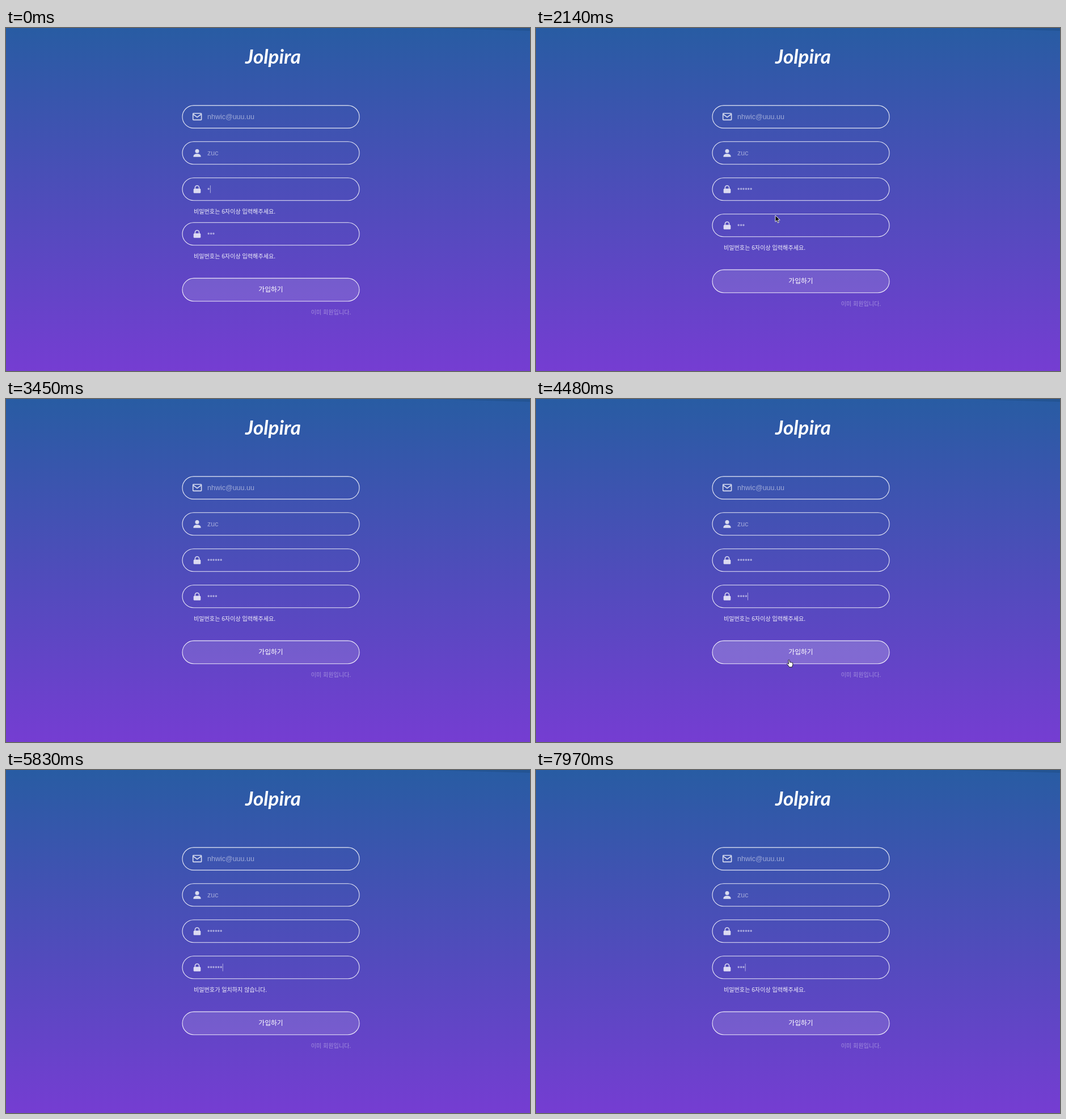
An HTML page that plays this animation: 924x606 px, repeating every 8 s.

```html
<!DOCTYPE html>
<html lang="ko">
<head>
<meta charset="utf-8">
<title>회원가입</title>
<style>
  html, body { margin: 0; width: 100%; height: 100%; overflow: hidden; background: #4e4cba; }
  svg { display: block; width: 100%; height: 100%; }
  text { fill: #fff; font-family: 'Noto Sans CJK KR', 'Noto Sans CJK', 'Noto Sans KR', sans-serif; }
  .logo { font: italic 700 35px Lato, sans-serif; }
  .pill { fill: none; stroke: #fff; stroke-opacity: .88; stroke-width: 1.1; }
  .icon { fill: #fff; opacity: .8; }
  .line { fill: none; stroke: #fff; stroke-width: 1.6; stroke-linejoin: round; }
  .value { font: 12.5px 'Liberation Sans', Arial, sans-serif; fill-opacity: .5; }
  .caret { stroke: #fff; stroke-opacity: .55; }
  .note { font-size: 10.1px; fill-opacity: .92; }
  .button { fill: #fff; }
  .label { font-size: 11.8px; font-weight: 500; }
  .link { font-size: 10.1px; fill-opacity: .4; }
</style>
</head>
<body>
<svg id="stage" viewBox="0 0 924 606">
  <defs>
    <linearGradient id="sky" x2="0" y2="1">
      <stop stop-color="#285ca3"/>
      <stop offset="1" stop-color="#753dd2"/>
    </linearGradient>
    <g id="mail">
      <rect class="line" x="329.7" y="13.9" width="14.9" height="11.6" rx="1"/>
      <path class="line" d="M330.2 15.6L337.1 20.7L344.1 15.6"/>
    </g>
    <g id="user">
      <circle cx="337" cy="16.6" r="3.5"/>
      <path d="M330.4 26.4C330.4 23 333 21.4 337 21.4S343.6 23 343.6 26.4Q343.6 27 343 27H331Q330.4 27 330.4 26.4Z"/>
    </g>
    <g id="lock">
      <rect x="330.7" y="19" width="12.6" height="8" rx="1.6"/>
      <path class="line" d="M333.4 20V17.3A3.6 3.6 0 0 1 340.6 17.3V20"/>
    </g>
  </defs>
  <rect width="924" height="606" fill="url(#sky)"/>
  <path d="M740 0H924V5Z" fill="#143c64" opacity=".25"/>
  <text class="logo" x="471" y="62.5" text-anchor="middle">Jolpira</text>
  <g id="fixed"></g>
  <g id="lower">
    <g id="confirm"></g>
    <text class="note" id="note2" x="331" y="392.3"></text>
    <rect class="pill button" id="button" x="311" y="427.1" width="312" height="40.6" rx="20.3"/>
    <text class="label" x="467" y="450.9" text-anchor="middle">가입하기</text>
    <text class="link" x="608.3" y="491.3" text-anchor="end">이미 회원입니다.</text>
  </g>
  <text class="note" id="note1" x="331" y="328.3">비밀번호는 6자이상 입력해주세요.</text>
  <g id="pointer" stroke-linejoin="round">
    <path id="arrow" fill="#111" stroke="#fff" stroke-width=".9"
      d="M0 0V11.4L2.6 9L4.4 13.2L6.4 12.3L4.6 8.2H8.2Z"/>
    <path id="beam" fill="none" stroke="#111" stroke-width="1"
      d="M-2.5 -6.5Q0 -6.5 0 -5V5Q0 6.5 -2.5 6.5M2.5 -6.5Q0 -6.5 0 -5M0 5Q0 6.5 2.5 6.5M-1.2 1.5H1.2"/>
    <path id="hand" fill="#fff" stroke="#111" stroke-width=".9"
      d="M-1.1 .8Q-1.1 -.2 -.1 -.2T1 .8L1.7 4.4Q2.7 3.5 3.4 4.6Q4.6 3.9 5.2 5Q6.6 4.4 6.9 6L6.8 8.6L5.7 11.6V12.7H.7L-.2 11.2L-3.2 7.6Q-3.8 6.2 -2.4 6L-.2 7.4Z"/>
  </g>
</svg>
<script>
const LOOP = 8000, BLINK = 560, SHIFT = 15;
const SHORT = '비밀번호는 6자이상 입력해주세요.';
const MISMATCH = '비밀번호가 일치하지 않습니다.';
const byId = id => document.getElementById(id);

// [time, number of typed characters]
const first = [[-40, 1], [250, 2], [530, 3], [800, 4], [1150, 5], [1420, 6]];
const second = [[-500, 3], [2350, 3], [2850, 4], [5250, 5], [5500, 6], [7480, 1], [7700, 2], [7930, 3]];
const FOCUS = 2350;

// Visible pointer trips: [time, x, y]
const trips = [
  [[1750, 452, 290], [2140, 422, 331], [2350, 412, 349], [2850, 412, 349]],
  [[3800, 412, 349], [4250, 446, 461], [4700, 446, 461], [5050, 408, 349], [5250, 408, 349]],
  [[6700, 408, 349], [6950, 392, 350], [7200, 287, 350], [7480, 287, 350]]
];

function field(parent, y, icon, value = '') {
  const g = document.createElementNS('http://www.w3.org/2000/svg', 'g');
  g.setAttribute('transform', `translate(0 ${y})`);
  g.innerHTML = `<rect class="pill" x="311" width="312" height="40" rx="20"/>
    <use class="icon" href="#${icon}"/>
    <text class="value" x="355" y="23.8">${value}</text>
    <path class="caret" d="M0 13.3V26.7" visibility="hidden"/>`;
  byId(parent).append(g);
  return { text: g.querySelector('text'), caret: g.querySelector('.caret') };
}

field('fixed', 136.9, 'mail', 'nhwic@uuu.uu');
field('fixed', 200.8, 'user', 'zuc');
const password = field('fixed', 264.8, 'lock');
const repeat = field('confirm', 328.8, 'lock');

const show = (el, on) => el.setAttribute('visibility', on ? 'visible' : 'hidden');

function type(box, keys, t, focused) {
  const [since, count] = keys.findLast(k => k[0] <= t);
  box.text.textContent = '•'.repeat(count);
  box.caret.setAttribute('transform', `translate(${356 + 4.375 * count} 0)`);
  show(box.caret, focused && (t - since) % (2 * BLINK) < BLINK);
  return count;
}

function pointerAt(t) {
  const trip = trips.find(p => t >= p[0][0] && t < p.at(-1)[0]);
  if (!trip) return null;
  const i = trip.findLastIndex(p => p[0] <= t);
  const [t0, x0, y0] = trip[i], [t1, x1, y1] = trip[i + 1];
  const u = (t - t0) / (t1 - t0), e = u * u * (3 - 2 * u);
  return { x: x0 + (x1 - x0) * e, y: y0 + (y1 - y0) * e };
}

function drawPointer(p) {
  const over = p && p.x > 311 && p.x < 623 && p.y > 427 && p.y < 468;
  const inText = p && p.x > 352 && p.x < 605 && [284.8, 348.8].some(y => Math.abs(p.y - y) < 8);
  show(byId('hand'), over);
  show(byId('beam'), inText);
  show(byId('arrow'), p && !over && !inText);
  if (p) byId('pointer').setAttribute('transform', `translate(${p.x} ${p.y})`);
  byId('button').setAttribute('fill-opacity', over ? .2 : .125);
}

function draw(t) {
  const n1 = type(password, first, t, t < 1980);
  const n2 = type(repeat, second, t, t >= FOCUS);
  const tooShort = n1 < 6;
  show(byId('note1'), tooShort);
  byId('lower').setAttribute('transform', `translate(0 ${tooShort ? SHIFT : 0})`);
  byId('note2').textContent = n2 < 6 ? SHORT : MISMATCH;
  drawPointer(pointerAt(t));
}

const start = performance.now();
function tick() {
  draw((performance.now() - start) % LOOP);
  requestAnimationFrame(tick);
}
tick();
</script>
</body>
</html>
```
